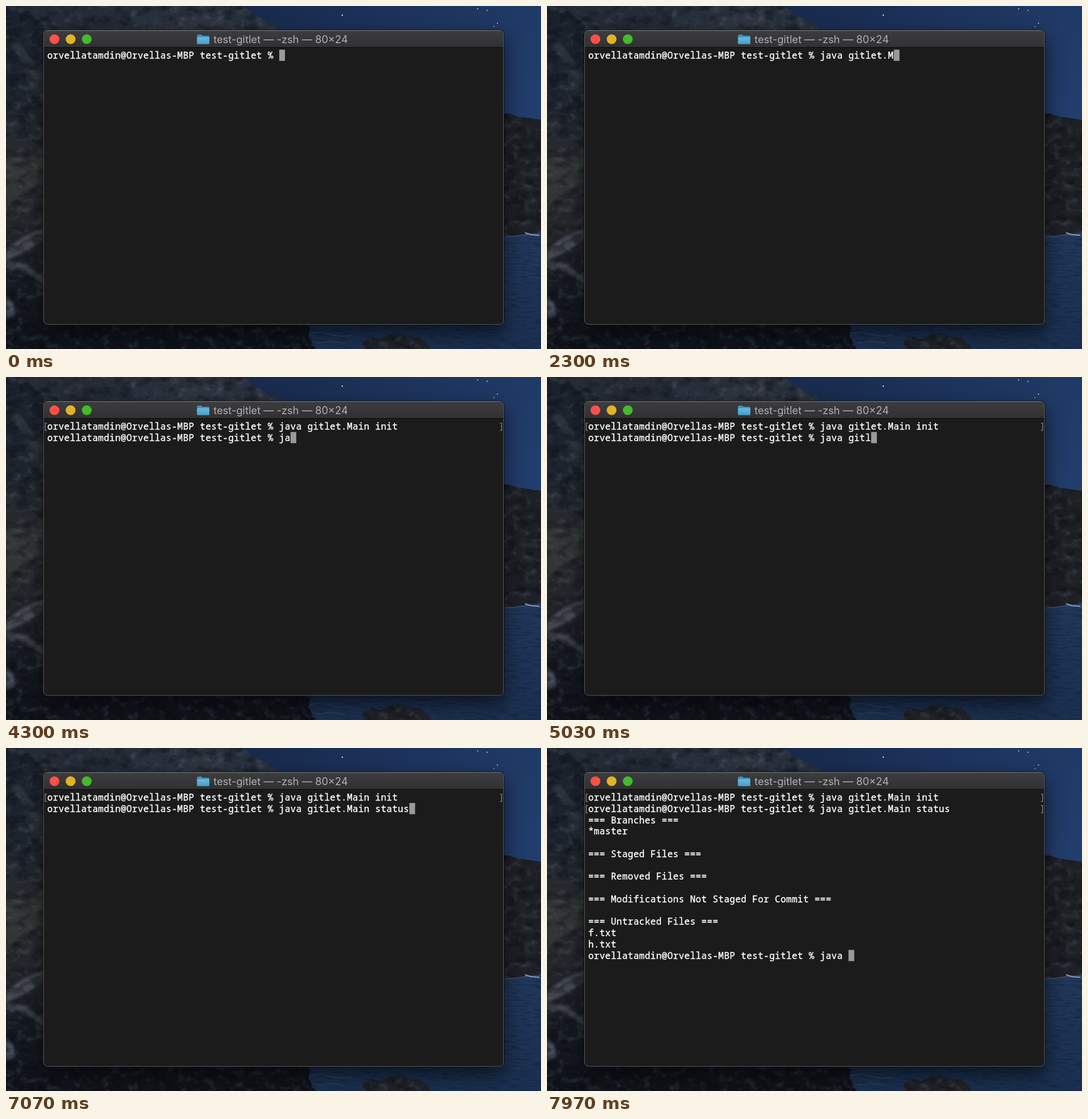
Write an HTML page that moves like this. It is 934 by 600 pixels and loops after 8000 ms.

```html
<!DOCTYPE html>
<html lang="en">
<head>
<meta charset="utf-8">
<title>Terminal</title>
<style>
  html, body { margin: 0; width: 100%; height: 100%; overflow: hidden; background: #10151e; }
  svg { position: absolute; left: 0; top: 0; display: block; }
  #scenery { will-change: transform; }
  .title { font: 400 18.15px Inter, "Liberation Sans", sans-serif; fill: #b1b1b3; }
  #rows text {
    font: 500 15.9px "Noto Sans Mono", "DejaVu Sans Mono", monospace;
    letter-spacing: .338px; white-space: pre; fill: #fff; stroke: #fff; stroke-width: .35px;
  }
  #rows .mark { font-weight: 400; letter-spacing: 0; fill: #858585; stroke: none; text-anchor: middle; }
</style>
</head>
<body>
<svg id="scenery" width="934" height="600" viewBox="0 0 934 600">
  <defs>
    <linearGradient id="sky" x1="0" y1="0" x2="1" y2=".35">
      <stop offset=".4" stop-color="#182a4c"/><stop offset="1" stop-color="#223e6d"/>
    </linearGradient>
    <linearGradient id="sea" x1="0" y1="0" x2="0" y2="1">
      <stop offset="0" stop-color="#213859"/><stop offset="1" stop-color="#1b3050"/>
    </linearGradient>
    <linearGradient id="slope" x1="0" y1="0" x2="0" y2="1">
      <stop offset="0" stop-color="#1a212c"/><stop offset=".3" stop-color="#1f252f"/>
      <stop offset=".45" stop-color="#292b2e"/><stop offset=".65" stop-color="#23252a"/>
      <stop offset=".8" stop-color="#171a22"/><stop offset="1" stop-color="#0f1219"/>
    </linearGradient>
    <linearGradient id="bar" x1="0" y1="0" x2="0" y2="1">
      <stop offset="0" stop-color="#3d3d3f"/><stop offset="1" stop-color="#313133"/>
    </linearGradient>
    <linearGradient id="folder" x1="0" y1="0" x2="0" y2="1">
      <stop offset="0" stop-color="#66bbe1"/><stop offset="1" stop-color="#4b9dca"/>
    </linearGradient>
    <filter id="light" x="0" y="0" width="1" height="1" color-interpolation-filters="sRGB">
      <feTurbulence type="fractalNoise" baseFrequency=".06 .08" numOctaves="4" seed="8"/>
      <feColorMatrix values="0 0 0 0 .42  0 0 0 0 .46  0 0 0 0 .53  3 0 0 0 -1.5"/>
    </filter>
    <filter id="dark" x="0" y="0" width="1" height="1" color-interpolation-filters="sRGB">
      <feTurbulence type="fractalNoise" baseFrequency=".045 .06" numOctaves="4" seed="3"/>
      <feColorMatrix values="0 0 0 0 .03  0 0 0 0 .04  0 0 0 0 .06  0 3 0 0 -1.4"/>
    </filter>
    <filter id="ripple" x="0" y="0" width="1" height="1" color-interpolation-filters="sRGB">
      <feTurbulence type="fractalNoise" baseFrequency=".05 .3" numOctaves="3" seed="5"/>
      <feColorMatrix values="0 0 0 0 .06  0 0 0 0 .12  0 0 0 0 .22  3 0 0 0 -1.4"/>
    </filter>
    <filter id="soft"><feGaussianBlur stdDeviation="2"/></filter>
    <filter id="shadow" x="-20%" y="-20%" width="140%" height="140%"><feGaussianBlur stdDeviation="17"/></filter>
    <path id="hills" d="M0 0H414L432 15L455 26L473 35L478 60H0Z"/>
    <path id="shore" d="M0 0H30L66 34V420L100 500L180 545L350 552L518 553L531 563L528 578L541 600H0Z"/>
    <path id="cliff" d="M850 188H878L893 193L912 196L934 199V396L915 398L894 402L850 403Z"/>
    <path id="boulder" d="M620 600L624 586L637 579L655 583L668 575L686 572L706 580L722 579L736 591L742 600Z"/>
    <clipPath id="land"><use href="#hills"/><use href="#shore"/><use href="#cliff"/><use href="#boulder"/></clipPath>
  </defs>

  <rect width="934" height="600" fill="url(#sky)"/>
  <g fill="#d9e3f2">
    <circle cx="587" cy="16" r="1.2"/><circle cx="823.5" cy="5" r=".9"/><circle cx="840" cy="7.5" r=".9"/>
    <circle cx="858" cy="30" r=".9"/><circle cx="852" cy="36" r=".8"/>
  </g>
  <rect y="402" width="934" height="198" fill="url(#sea)"/>
  <rect y="402" width="934" height="198" filter="url(#ripple)" opacity=".5"/>
  <use href="#hills" fill="#28303c"/>
  <path d="M30 0H150L205 10L245 42H66Z" fill="#242b36"/>
  <path d="M230 42L300 20L345 6L380 20L420 42Z" fill="#2d343f"/>
  <use href="#shore" fill="url(#slope)"/>
  <use href="#cliff" fill="#1e2026"/>
  <use href="#boulder" fill="#202329"/>
  <g filter="url(#soft)">
    <path d="M0 62L26 92L44 150L66 178V120L20 60Z" fill="#29303b"/>
    <path d="M0 268L28 264L66 246V306L30 326L0 352Z" fill="#333536"/>
    <path d="M0 424L34 402L66 388V408L28 432L0 446Z" fill="#42454f"/>
    <path d="M0 446L32 450L66 476V488L32 462L0 458Z" fill="#373a44"/>
    <path d="M0 506L13 520L16 540L0 548Z" fill="#3e4550"/>
  </g>
  <g clip-path="url(#land)">
    <rect width="934" height="600" filter="url(#light)" opacity=".26"/>
    <rect width="934" height="600" filter="url(#dark)" opacity=".42"/>
  </g>
  <g fill="none" stroke="#6b7d95" stroke-linecap="round">
    <path d="M872 404L892 402L913 399L934 403" stroke-width="1.2" opacity=".6"/>
    <path d="M907 397L917 400L930 401" stroke="#8c99aa" stroke-width="2.2"/>
    <path d="M531 573Q552 568 566 574T604 576M543 590Q569 584 591 590" stroke-width="1" opacity=".35"/>
  </g>
  <rect x="66" y="56" width="803" height="515" rx="8" filter="url(#shadow)" opacity=".62"/>

  <rect x="64.5" y="41.5" width="805" height="516.5" rx="8" fill="none" stroke="#000" opacity=".55"/>
  <rect x="65.5" y="42.5" width="803" height="514.5" rx="7" fill="#1b1b1b"/>
  <path d="M65.5 72V50Q65.5 42.5 73 42.5H861Q868.5 42.5 868.5 50V72Z" fill="url(#bar)"/>
  <path d="M66 72.5H868" stroke="#080808"/>
  <rect x="65.5" y="42.5" width="803" height="514.5" rx="7" fill="none" stroke="#5b5c5e"/>
  <path d="M72 43H862" stroke="#6b6c6e"/>
  <circle cx="84.6" cy="58" r="8.6" fill="#ff5049"/>
  <circle cx="112.8" cy="58" r="8.6" fill="#e1b425"/>
  <circle cx="141" cy="58" r="8.6" fill="#45ba2b"/>
  <path d="M333.5 52Q333.5 50 335.5 50H341L343 52H353Q355 52 355 54V65Q355 66.5 353.5 66.5H335Q333.5 66.5 333.5 65Z" fill="#3f91bd"/>
  <rect x="333.5" y="54.5" width="21.5" height="12" rx="1.3" fill="url(#folder)"/>
  <text class="title" x="479.5" y="65" text-anchor="middle">test-gitlet — -zsh — 80×24</text>
</svg>

<svg width="934" height="600" viewBox="0 0 934 600">
  <rect id="cursor" width="10" height="19.6" fill="#999"/>
  <g id="rows"></g>
</svg>

<script>
const LOOP = 8000, CELL = 9.878, LINE = 19.77, LEFT = 72, TOP = 76.4;
const PROMPT = 'orvellatamdin@Orvellas-MBP test-gitlet % ';
const REPORT = [
  '=== Branches ===', '*master', '',
  '=== Staged Files ===', '',
  '=== Removed Files ===', '',
  '=== Modifications Not Staged For Commit ===', '',
  '=== Untracked Files ===', 'f.txt', 'h.txt'
];
// start: first key, step: ms per key, enter: Return pressed, done: next prompt shown
const COMMANDS = [
  { text: 'java gitlet.Main init', start: 317, step: 157, enter: 3780, done: 4000, output: [] },
  { text: 'java gitlet.Main status', start: 4118, step: 112, enter: 7210, done: 7440, output: REPORT },
  { text: 'java ', start: 7560, step: 95, enter: Infinity }
];

const cursor = document.getElementById('cursor');
const rowGroup = document.getElementById('rows');

function addText(x, y, className) {
  const el = document.createElementNS('http://www.w3.org/2000/svg', 'text');
  el.setAttribute('x', x);
  el.setAttribute('y', y);
  if (className) el.setAttribute('class', className);
  return rowGroup.appendChild(el);
}

const rows = Array.from({ length: 15 }, (_, i) => {
  const y = TOP + 15.6 + LINE * i;
  return { line: addText(LEFT, y), open: addText(68.8, y, 'mark'), close: addText(865, y, 'mark') };
});

function setText(el, text) {
  if (el.textContent !== text) el.textContent = text;
}

function screenAt(t) {
  const lines = [];
  for (const { text, start, step, enter, done, output } of COMMANDS) {
    const typed = Math.max(0, Math.floor((t - start) / step) + 1);
    lines.push({ text: PROMPT + text.slice(0, typed), entered: t >= enter });
    if (t < enter) break;
    if (t < done) {
      lines.push({ text: '' });
      break;
    }
    lines.push(...output.map(text => ({ text })));
  }
  return lines;
}

function draw() {
  const lines = screenAt(performance.now() % LOOP);
  rows.forEach((row, i) => {
    const { text = '', entered = false } = lines[i] || {};
    setText(row.line, text);
    setText(row.open, entered ? '[' : '');
    setText(row.close, entered ? ']' : '');
  });
  const last = lines.length - 1;
  cursor.setAttribute('x', LEFT + lines[last].text.length * CELL);
  cursor.setAttribute('y', TOP + last * LINE);
  requestAnimationFrame(draw);
}
draw();
</script>
</body>
</html>
```
